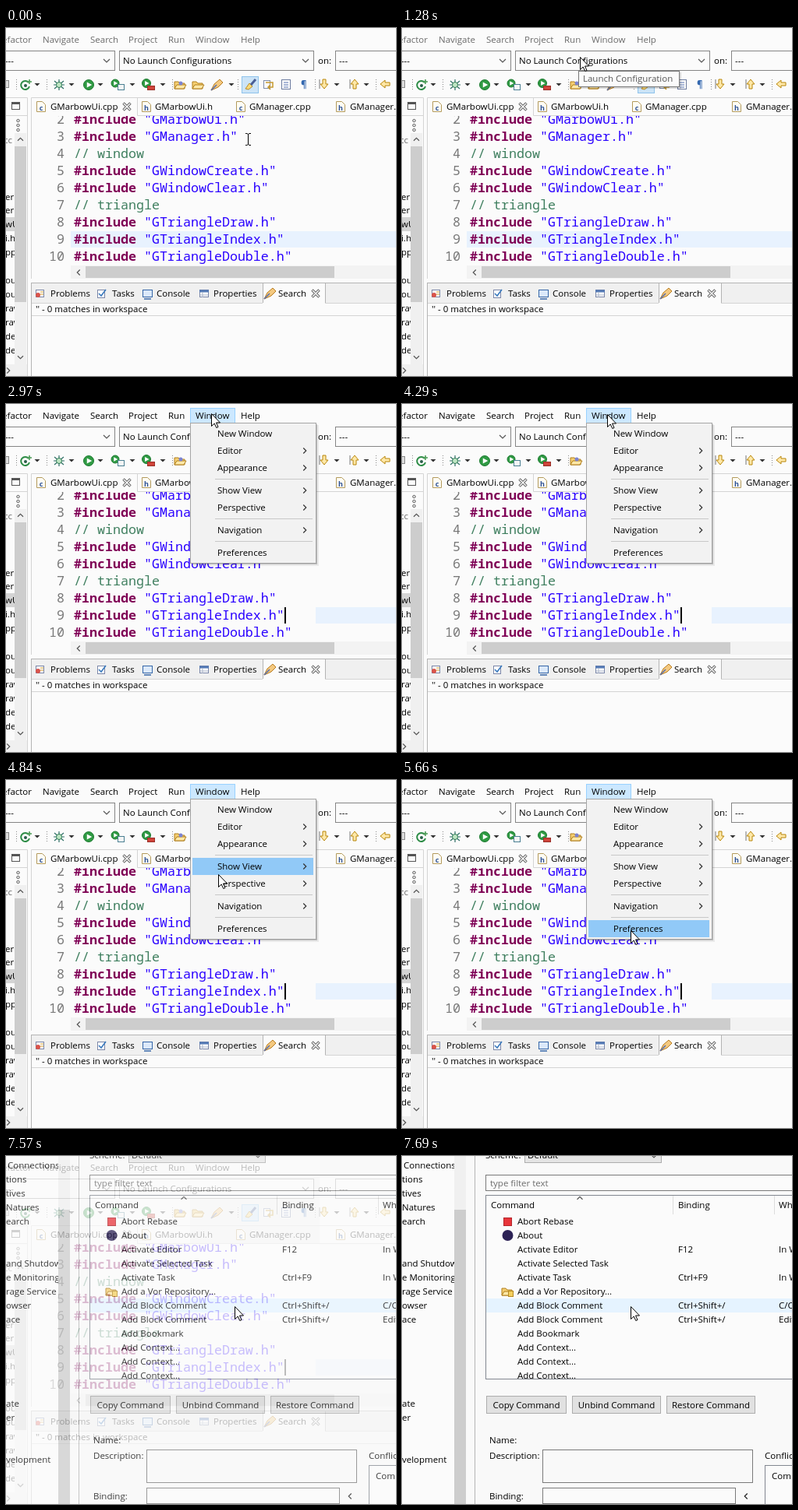
Animation, 500 px wide and 447 px high, one loop 8000 ms. Source, as an HTML page:

```html
<!DOCTYPE html>
<html lang="en">
<head>
<meta charset="utf-8">
<title>Opening the preferences</title>
<style>
html, body { margin: 0; width: 100%; height: 100%; overflow: hidden; background: #fbfbfb; }
svg { display: block; width: 500px; height: 447px; }
text { font: 11.5px "Open Sans", "Noto Sans", sans-serif; fill: #000; white-space: pre; }
.code text { font: 16.67px "Noto Sans Mono", "DejaVu Sans Mono", monospace; }
.code .number { fill: #787878; text-anchor: end; }
.code .keyword { fill: #7f0055; font-weight: bold; }
.code .string { fill: #2a00ff; }
.code .comment { fill: #3f7f5f; }
text.faint { fill: #6d6d6d; }
text.soft { fill: #575757; }
text.mark { fill: #3569b0; font-weight: bold; }
text.letter { font-size: 9px; font-weight: bold; fill: #2a4f96; }
.end { text-anchor: end; }
.mid { text-anchor: middle; }
.menubar text { fill: inherit; }
.anim, .menubar { animation: 8s step-end infinite; }
.menubar { animation-name: menubar; }
.arrow { animation-name: arrow; }
.beam { animation-name: beam; }
.hover { animation-name: hover; }
.tip { animation-name: tip; }
.popup { animation-name: popup; }
.opened { animation-name: opened; }
.choice { animation-name: choice; }
.repaint { animation-name: repaint; }
.row { animation-name: row; }
.caret { animation-name: caret; }
.dialog { animation-name: dialog; }

@keyframes menubar { 0% { fill: #6a6a6a; } 33.625% { fill: #000; } }
@keyframes arrow {
  0% { opacity: 0; transform: translate(300px, 130px); }
  1.875% { opacity: 1; transform: translate(275px, 108px); }
  3.5% { transform: translate(247px, 75px); }
  5.375% { transform: translate(228px, 43px); }
  7.25% { transform: translate(228px, 37px); }
  14.125% { transform: translate(227px, 36px); }
  16% { transform: translate(228px, 37px); }
  21.625% { transform: translate(232px, 33px); }
  23.25% { transform: translate(242px, 25px); }
  24.875% { transform: translate(254px, 17px); }
  26.5% { transform: translate(260px, 14px); }
  28.375% { transform: translate(262px, 13px); }
  30.25% { transform: translate(263px, 12px); }
  53.625% { transform: translate(263px, 13px); }
  57% { transform: translate(265px, 38px); }
  58.625% { transform: translate(268px, 62px); }
  60.5% { transform: translate(272px, 121px); }
  62.125% { transform: translate(275px, 140px); }
  63.75% { transform: translate(278px, 159px); }
  65.625% { transform: translate(284px, 172px); }
  67.25% { transform: translate(290px, 184px); }
  68.875% { transform: translate(293px, 189px); }
  70.75% { opacity: 1; transform: translate(293px, 193px); }
  82% { opacity: 0; transform: translate(293px, 193px); }
  94.625% { opacity: 1; transform: translate(293px, 193px); }
}
@keyframes beam {
  0% { opacity: 1; transform: translate(310px, 143px); }
  1.875% { opacity: 0; }
  82% { opacity: 1; transform: translate(295px, 194px); }
  94.625% { opacity: 0; }
}
@keyframes hover { 0% { opacity: 0; } 3.5% { opacity: 1; } 5.375% { opacity: 0; } }
@keyframes tip {
  0% { opacity: 0; } 12.5% { opacity: .5; } 14.125% { opacity: 1; }
  21.625% { opacity: .6; } 23.25% { opacity: 0; }
}
@keyframes popup {
  0% { opacity: 0; } 33.625% { opacity: .5; } 35.25% { opacity: .85; }
  37.125% { opacity: 1; } 82% { opacity: 0; }
}
@keyframes opened { 0% { opacity: 0; } 33.625% { opacity: 1; } 82% { opacity: 0; } }
@keyframes choice {
  0% { opacity: 0; transform: translateY(38px); }
  57% { opacity: 1; transform: translateY(38px); }
  58.625% { transform: translateY(60px); }
  60.5% { transform: translateY(111px); }
  62.125% { transform: translateY(133px); }
  63.75% { transform: translateY(162px); }
  67.25% { transform: translateY(191px); }
}
@keyframes repaint { 0% { opacity: 0; } 82% { opacity: 1; } }
@keyframes row { 0% { transform: none; } 33.625% { transform: translateX(314px); } }
@keyframes caret { 0% { opacity: 0; } 33.625% { opacity: 1; } }
@keyframes dialog { 0% { opacity: 0; } 94.625% { opacity: .75; } 96.125% { opacity: 1; } }
</style>
</head>
<body>
<svg id="stage" viewBox="0 0 500 447"></svg>
<script>
const text = (x, y, s, cls = '') => `<text x="${x}" y="${y}" class="${cls}">${s}</text>`;
const box = (x, y, w, h, fill, stroke) => stroke
  ? `<rect x="${x + .5}" y="${y + .5}" width="${w - 1}" height="${h - 1}" fill="${fill}" stroke="${stroke}"/>`
  : `<rect x="${x}" y="${y}" width="${w}" height="${h}" fill="${fill}"/>`;
const path = (d, stroke, width = 1, fill = 'none') =>
  `<path d="${d}" fill="${fill}" stroke="${stroke}" stroke-width="${width}"/>`;
const shape = (d, fill) => `<path d="${d}" fill="${fill}"/>`;
const dot = (x, y, r, fill, stroke = 'none') =>
  `<circle cx="${x}" cy="${y}" r="${r}" fill="${fill}" stroke="${stroke}"/>`;
const group = (cls, ...parts) => `<g class="${cls}">${parts.join('')}</g>`;
const at = (x, y, s) => `<g transform="translate(${x} ${y})">${s}</g>`;
const each = (list, draw) => list.map(draw).join('');
const clipped = (id, x, y, w, h, ...parts) =>
  `<clipPath id="${id}">${box(x, y, w, h)}</clipPath><g clip-path="url(#${id})">${parts.join('')}</g>`;

const paper = '#fbfbfb';
const edge = '#d4d4d4';

const chevron = (x, y, turn = 0, size = 4, color = '#555') =>
  `<g transform="translate(${x} ${y}) rotate(${turn})">${path(`M${-size} ${-size / 2}L0 ${size / 2}L${size} ${-size / 2}`, color, 1.2)}</g>`;
const cross = (x, y) => path(`M${x - 4.5} ${y - 4.5}l9 9m0 -9l-9 9`, '#666', 3.4) +
  path(`M${x - 4} ${y - 4}l8 8m0 -8l-8 8`, '#fff', 1.4);
const drop = x => shape(`M${x - 3.5} 71h7l-3.5 3.5z`, '#333');
const grip = x => each([66, 69, 72, 75, 78], y => box(x, y, 1, 1, '#888'));
const folder = (x, y) => at(x, y, path('M-7 5V-4H-2L0 -2H6V5Z', '#b07f1c', 1, '#f5cf72') +
  path('M-7 5L-4 0H8L5 5Z', '#b07f1c', 1, '#ffe8a6'));
const play = (x, y, r) => dot(x, y, r, '#2f9a43', '#1d7a31') +
  shape(`M${x - r * .35} ${y - r * .55}v${r * 1.1}l${r} ${-r * .55}z`, '#fff');
const pen = (x, y) => at(x, y, path('M-7 7L-3 -1L4 -7L8 -3L2 3Z', '#b77a1c', 1, '#f4c980') +
  path('M-7 7L0 0', '#5a6fa8', 1.6));
const fileIcon = (x, letter) => path(`M${x - 5.5} 94.5h7l4 4v9h-11z`, '#b39a5c', 1, '#fffdf4') +
  text(x, 105.5, letter, 'mid letter');
const bentArrow = (x, turn) => `<g transform="translate(${x} 72) rotate(${turn})">${
  path('M-2 -6H2V0H5L0 6L-5 0H-2Z', '#b8860b', 1, '#ffe8a8')}</g>`;

// The area under the closed menu comes back in cleaner tones.
const repaint = (y, h, fill) => group('anim repaint', box(236, y, 166, h, fill));

const menubar = group('menubar',
  text(33, 19, 'Refactor', 'end'),
  each([[47, 'Navigate'], [108, 'Search'], [157, 'Project'], [208, 'Run'], [243, 'Window'], [301, 'Help']],
    ([x, s]) => text(x, 19, s)));

const combos = box(-20, 29, 160, 26, paper, '#858585') + box(145, 29, 250, 26, paper, '#858585') +
  box(422, 29, 90, 26, paper, '#858585') + text(10, 46, '---', 'end') +
  text(150, 46, 'No Launch Configurations') + text(400, 46, 'on:') + text(427, 46, '---') +
  chevron(129, 42) + chevron(384, 42);

const bug = at(68, 73, path('M-6 -5L6 5M6 -5L-6 5M-7 0H7M0 -7V7', '#2f6f66', 1.2) +
  dot(0, 0, 3.5, '#bfe6c4', '#2e7a55'));
const toolbar = [
  box(-4, 67, 8, 10, '#ddd', '#888'),
  path('M29 70A5.5 5.5 0 1 0 30 75', '#2d8c46', 2), dot(25, 74, 2, '#2b5f4a'), path('M27 69h6m-3 -3v6', '#4b9b55', 1.6),
  bug, play(106, 73, 6.5), play(140, 71, 5), box(143, 72, 9, 8, '#f5f5f5', '#4a7f92'),
  play(180, 71, 5.5), box(181, 74, 10, 6, '#d0443a', '#9a2f28'),
  folder(223, 73), dot(224, 71, 2.5, '#7d84d0'), folder(246, 73), pen(270, 73),
  box(302, 62, 22, 22, '#cce4f7', '#8fc3ec'),
  path('M307 78L312 71L316 75L311 79Z', '#b98a2a', 1, '#f7d977'), path('M314 73L320 66', '#4a5f96', 3),
  box(330, 67, 9, 11, paper, '#7f8ca8'), path('M333 70h9v6h-6m3 -3l-3 3l3 3', '#c79a2e', 1.5),
  box(353, 66, 12, 13, paper, '#6d7ca0'), path('M356 70h6m-6 3h6m-6 3h6', '#5571b0'),
  text(378, 77, '¶', 'mark'),
  bentArrow(408, 0), bentArrow(447, 180), bentArrow(486, 90),
  path('M402 66v12M441 66v12', '#777'),
  each([40, 84, 121, 162, 201, 289, 424, 462], drop),
  each([13, 52, 213, 297, 396, 474], grip)
].join('');

const tabs = path('M32.5 322V89.5H500M168.5 90V112.5H500', edge) +
  each([[45, 'c', 57, 'GMarbowUi.cpp'], [180, 'h', 191, 'GMarbowUi.h'],
    [301, 'c', 312, 'GManager.cpp'], [429, 'h', 441, 'GManager.h']],
    ([icon, letter, x, s]) => fileIcon(icon, letter) + text(x, 105, s)) + cross(155, 101);

const lines = ['GMarbowUi', 'GManager', '// window', 'GWindowCreate', 'GWindowClear', '// triangle',
  'GTriangleDraw', 'GTriangleIndex', 'GTriangleDouble'];
const code = (s, i) => {
  const y = 123 + 22 * i;
  const body = s.startsWith('//') ? text(87, y, s, 'comment')
    : text(87, y, `<tspan class="keyword">#include</tspan> <tspan class="string">"${s}.h"</tspan>`);
  return text(75, y, i + 2, 'number') + body;
};
const editor = clipped('view', 33, 113, 467, 192,
  box(33, 113, 467, 192, paper), repaint(113, 99, '#fff'),
  group('anim row', box(83, 261, 500, 21, '#e8f2fe')), group('code', each(lines, code)),
  group('anim caret', box(357, 261, 2, 21, '#000'))) +
  box(83, 305, 417, 17, '#f3f3f3') + box(102, 306, 319, 15, '#cdcdcd') + chevron(93, 314, 90, 3.5);

const tree = [[217, 'er.c'], [234, 'er.h'], [252, 'wUi'], [270, 'i.h'], [288, 'pp'], [324, 'oub'],
  [342, 'ou.'], [360, 'raw'], [378, 'raw'], [396, 'de'], [414, 'de']];
const explorer = path('M0 89.5H27.5V447', edge) + box(7, 95, 11, 10, paper, '#555') +
  path('M7 97h11', '#555', 2) + path('M0 112.5H27', edge) +
  each([119, 125, 131], y => dot(15.5, y, 1.7, paper, '#555')) +
  box(11, 135, 15, 297, '#f0f0f0') + box(11, 152, 15, 200, '#cdcdcd') +
  chevron(18.5, 143, 180, 3.5) + chevron(18.5, 423, 0, 3.5) + box(0, 243, 11, 18, '#d4d4d4') +
  clipped('tree', 0, 135, 11, 297,
    `<g fill="#d2691e">${text(8, 148, 'cc', 'end faint')}</g>`, each(tree, ([y, s]) => text(-1, y + 4, s))) +
  box(0, 432, 27, 15, '#f0f0f0') + chevron(3, 440, -90, 3.5);

const views = box(32, 327, 480, 130, paper, '#b4b4b4') + box(33, 328, 467, 25, '#f0f0f0') +
  box(329, 328, 80, 26, paper) +
  path('M329.5 328V353M409.5 328V353', '#b4b4b4') + path('M33 353.5H329M409 353.5H500M33 369.5H500', edge) +
  box(38, 336, 11, 10, '#fff', '#7a86a8') + dot(41, 343, 3, '#d9534a') + path('M44 339h4m-4 3h4', '#d8a22e') +
  box(117, 336, 10, 11, '#fff', '#7a86a8') + path('M119 341l3 3l6 -8', '#3979bd', 1.6) +
  box(175, 336, 13, 10, '#dbe9fa', '#3566a8') + path('M177 348h9', '#3566a8', 1.5) +
  box(248, 336, 12, 10, '#fff', '#7a86a8') + path('M248 338h12', '#5379b5', 3) + path('M252 339v7m-3 -3h10', '#aab4c8') +
  pen(338, 341) + each([[57, 'Problems'], [136, 'Tasks'], [193, 'Console'], [266, 'Properties'], [349, 'Search']],
    ([x, s]) => text(x, 345, s)) + cross(397, 341) + text(38, 365, "'' - 0 matches in workspace");

const tip = group('anim tip', box(229, 57, 129, 21, '#0002'), box(226, 55, 130, 21, '#fbfbfb', '#777'),
  text(232, 69, 'Launch Configuration', 'soft'));

const entries = [[38, 'New Window'], [60, 'Editor', 1], [82, 'Appearance', 1], [111, 'Show View', 1],
  [133, 'Perspective', 1], [162, 'Navigation', 1], [191, 'Preferences']];
const popup = group('anim opened', box(236, 5, 58, 20, '#cce8ff', '#99d1ff'), text(243, 19, 'Window')) +
  group('anim popup', box(240, 27, 161, 181, '#0001'), box(239, 26, 160, 180, '#0003'),
    box(236, 24, 162, 181, '#f2f2f2', '#a5a5a5'),
    path('M268 96.5H393M268 147.5H393M268 176.5H393', '#c8c8c8'),
    group('anim choice', box(239, -11, 155, 22, '#91c9f7')),
    each(entries, ([y, s, more]) => text(271, y + 4, s) + (more ? chevron(383, y, -90, 3.5, '#333') : '')));

const pages = [[30, 'tions'], [48, 'tives'], [66, 'Natures'], [84, 'earch'], [138, 'and Shutdow'],
  [156, 'e Monitoring'], [174, 'rage Service'], [192, 'owser'], [210, 'ace'], [318, 'ate'], [336, 'er'],
  [390, 'velopment']];
const commands = [['Abort Rebase'], ['About'], ['Activate Editor', 'F12', 'In Windows'], ['Activate Selected Task'],
  ['Activate Task', 'Ctrl+F9', 'In Windows'], ['Add a Vor Repository...'],
  ['Add Block Comment', 'Ctrl+Shift+/', 'C/C++ Editor'], ['Add Block Comment', 'Ctrl+Shift+/', 'Editing'],
  ['Add Bookmark'], ['Add Context...'], ['Add Context...'], ['Add Context...']];
const command = ([name, keys = '', when = ''], i) => {
  const y = 88 + 18 * i;
  return text(148, y, name) + text(354, y, keys) + text(483, y, when);
};
const button = (x, w, s) => box(x, 308, w, 23, '#e1e1e1', '#adadad') + text(x + w / 2, 324, s, 'mid');
const dialog = group('anim dialog',
  box(0, 0, 500, 447, '#f9f9f9'), box(0, 0, 67, 447, paper),
  clipped('pages', 0, 0, 67, 447, text(2, 16, 'Connections'), each(pages, ([y, s]) => text(0, y + 4, s))),
  box(67, 0, 15, 447, '#f0f0f0'), box(67, 69, 15, 378, '#cdcdcd'), path('M93.5 0V447', '#b5b5b5'),
  text(107, 3, 'Scheme:'), box(157, -12, 176, 21, '#e5e5e5', '#adadad'), text(161, 3, 'Default'), chevron(323, 0),
  box(107, 24, 400, 21, paper, '#7a7a7a'), text(113, 39, 'type filter text', 'faint'),
  box(107, 50, 400, 237, paper, '#828790'), path('M347.5 51V75M477.5 51V75', '#dcdcdc'), chevron(228, 54, 180, 3.5),
  text(114, 67, 'Command'), text(354, 67, 'Binding'), text(483, 67, 'When'),
  box(108, 183, 392, 18, '#e5f3ff'),
  clipped('table', 108, 76, 392, 210, each(commands, command)),
  box(130, 79, 11, 11, '#e8353b', '#b3262b'), dot(135.5, 102, 7, '#2c2255'),
  folder(135, 174), box(136, 173, 7, 8, '#f4cf5e', '#b58a24'),
  button(108, 103, 'Copy Command'), button(218, 114, 'Unbind Command'), button(339, 114, 'Restore Command'),
  text(112, 369, 'Name:'), text(112, 389, 'Description:'), text(112, 441, 'Binding:'),
  box(180, 377, 270, 43, '#f9f9f9', '#7a7a7a'), box(180, 426, 248, 21, paper, '#7a7a7a'),
  chevron(441, 437, 90, 3.5, '#222'), text(465, 389, 'Conflicts:'),
  box(465, 397, 60, 60, paper, '#828790'), text(474, 415, 'Command'));

const beam = group('anim beam', path('M-3 -7.5H-1L.5 -6.5L2 -7.5H4M.5 -6.5V6.5M-3 7.5H-1L.5 6.5L2 7.5H4', '#000'));
const arrow = group('anim arrow', path('M.5 .5V16.5L4.2 13L6.8 18.5L9 17.5L6.5 12H11.5Z', '#000', 1, '#fff'));
const hover = group('anim hover', box(236, 62, 22, 22, '#d8eaf9', '#a9d1f0'), folder(246, 73));

document.getElementById('stage').innerHTML = box(0, 0, 500, 447, paper) +
  repaint(5, 21, '#fff') + repaint(26, 87, '#f0f0f0') + menubar + combos + toolbar +
  hover + explorer + tabs + editor + views + tip + popup + dialog + beam + arrow;
</script>
</body>
</html>
```
